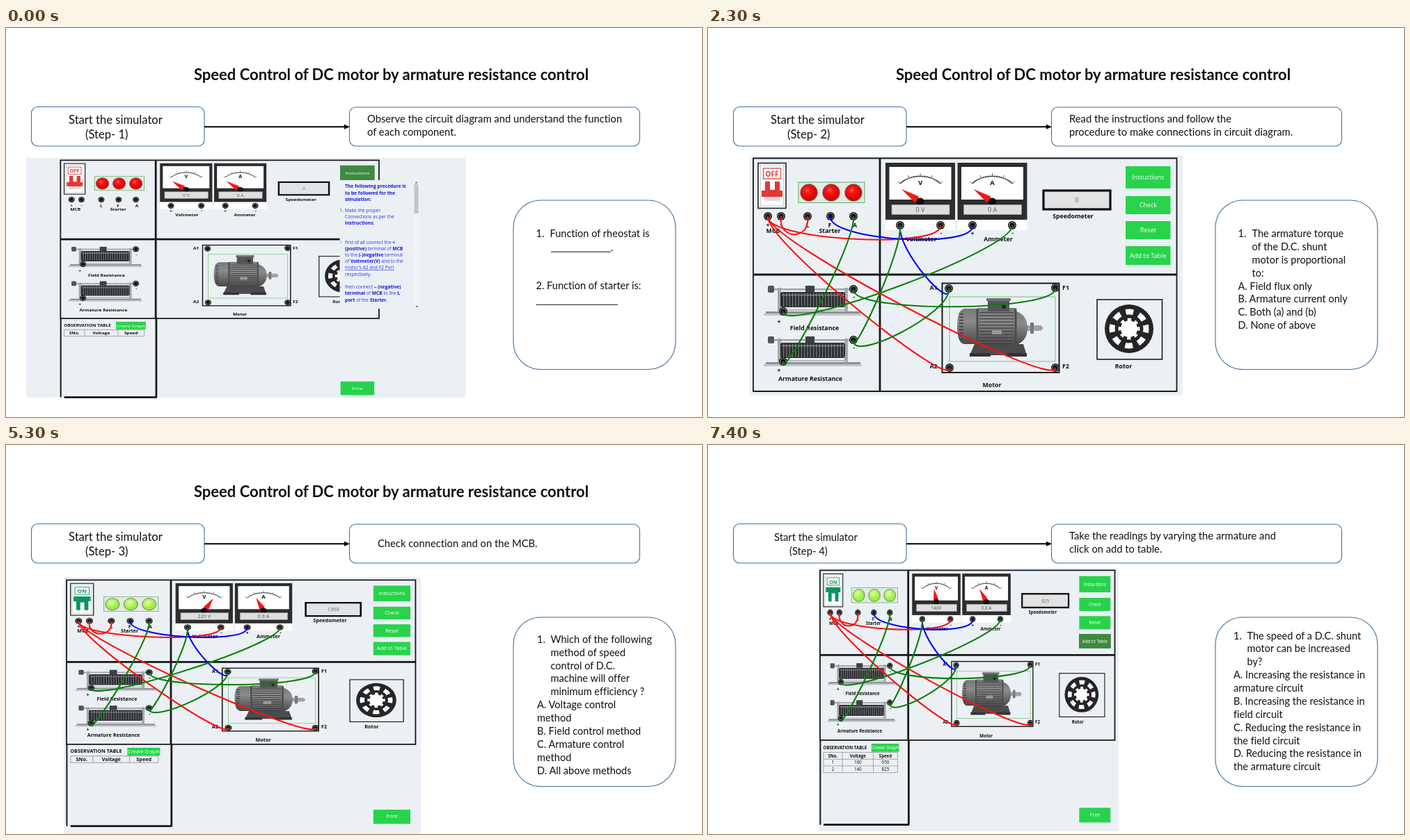
Animation of 1000x560 px, one loop 8 s. Source, as an HTML page:

```html
<!DOCTYPE html>
<html lang="en">
<head>
<meta charset="utf-8">
<title>DC motor speed control</title>
<style>
html, body { margin: 0; width: 100%; height: 100%; overflow: hidden; background: #fff }
svg { display: block; width: 1000px; height: 560px }
text { font-family: Lato, Carlito, sans-serif; font-size: 14.75px; font-variant-ligatures: none; fill: #111; white-space: pre }
.quiz text { font-size: 14.55px }
.ui text { font: 9px "Open Sans", "Noto Sans", sans-serif }
.ui .b { font-weight: 700; font-size: 8.8px }
.ui .help text { font-size: 6.6px; fill: #3434dd }
.help .b { font-size: 6.7px; fill: #1616e6 }
.mid { text-anchor: middle }
.box { fill: #fff; stroke: #41719c; stroke-width: 1.1 }
.frame, .wire { fill: none; vector-effect: non-scaling-stroke }
.frame { stroke: #16191c }
.wire { stroke-width: 2.1 }
</style>
</head>
<body>
<svg id="stage" viewBox="0 0 1000 560">
<defs>
  <linearGradient id="steel" x2="0" y2="1">
    <stop stop-color="#777"/><stop offset=".35" stop-color="#8b8b8b"/><stop offset="1" stop-color="#484848"/>
  </linearGradient>
  <radialGradient id="red" cx=".4" cy=".35"><stop stop-color="#ff5a4a"/><stop offset=".4" stop-color="#fb1212"/><stop offset="1" stop-color="#d80808"/></radialGradient>
  <radialGradient id="lime" cx=".4" cy=".35"><stop stop-color="#dcff9a"/><stop offset="1" stop-color="#9bec45"/></radialGradient>
</defs>
</svg>
<script>
const rect = (x, y, w, h, fill, extra = '') =>
  `<rect x="${x}" y="${y}" width="${w}" height="${h}" fill="${fill}" ${extra}/>`;
const text = (x, y, s, extra = '') => `<text x="${x}" y="${y}" ${extra}>${s}</text>`;
const mid = (x, y, s, extra = '') => text(x, y, s, `class="mid" ${extra}`);
const label = (x, y, s, extra = '') => text(x, y, s, `class="mid b" ${extra}`);
const disc = (x, y, r, fill, extra = '') => `<circle cx="${x}" cy="${y}" r="${r}" fill="${fill}" ${extra}/>`;
const path = (d, fill, extra = '') => `<path d="${d}" fill="${fill}" ${extra}/>`;
const line = (d, color, width = 1, extra = '') => path(d, 'none', `stroke="${color}" stroke-width="${width}" ${extra}`);
const frame = (d, width) => `<path class="frame" d="${d}" stroke-width="${width}"/>`;
const lines = (x, y, step, rows) => rows.map((s, i) => text(x, y + i * step, s)).join('');

const back = '#ebf0f5';
const terminal = (x, y) => disc(x, y, 6, '#111') + disc(x, y, 4.2, '#111', 'stroke="#aaa" stroke-width=".9"');

function button(y, h, s, active) {
  return rect(600, y, 64.5, h, active ? '#3d8b40' : '#28d34b', active ? 'stroke="#286f2d"' : '') +
    mid(632.3, y + h / 2 + 3.2, s, 'style="fill:#fff"');
}

function breaker(on) {
  const c = on ? '#0b9464' : '#e33836';
  return rect(72, 194.5, 40, 65, '#f4f5f7', 'stroke="#222" stroke-width="1.6"') +
    rect(75.5, 198, 33, 58, '#fdfdfd', 'stroke="#bbb" stroke-width=".7"') +
    rect(79.5, 202, 25, 15, '#fff', `stroke="${c}" stroke-width="1.2"`) +
    label(92, 214, on ? 'ON' : 'OFF', `style="fill:${c};font-size:10px"`) +
    (on ? path('M77 221H107V231H103V249H96V233H89V249H82V231H77Z', c)
        : rect(81, 242, 23, 7, '#ddd') + path('M82 221H89V233H96V221H103V234H107V243H77V234H82Z', c));
}

function meter(x, unit, value, tip) {
  let ticks = '';
  for (let i = 0; i <= 20; i++) {
    const a = (i / 20 - .5) * 1.55, r = i % 5 ? 43 : 46;
    ticks += `M${x + 41 * Math.sin(a)} ${250 - 36 * Math.cos(a)}L${x + r * Math.sin(a)} ${250 - (r - 5) * Math.cos(a)}`;
  }
  const dx = tip[0] - x, dy = tip[1] - 250, n = Math.hypot(dx, dy), px = -dy / n * 5, py = dx / n * 5;
  const bx = x + dx * .22, by = 250 + dy * .22;
  return rect(x - 50, 194, 100, 97, '#fff') + rect(x - 50, 194, 100, 82, '#2d2d2f') +
    rect(x - 44.5, 200, 89, 47, '#fff') +
    line(`M${x - 29} 224A41 36 0 0 1 ${x + 29} 224`, '#333', 1.2) + line(ticks, '#333', .8) +
    label(x, 226, unit, 'style="font-size:9.5px"') +
    path(`M${tip}L${bx + px} ${by + py}L${x} 250L${bx - px} ${by - py}Z`, '#fa1414') +
    disc(x, 250, 5.5, '#0b0b0b') +
    rect(x - 41, 254.5, 83, 14, '#dedede', 'stroke="#999" stroke-width=".8"') +
    mid(x, 265, value, 'style="fill:#555"');
}

function rheostat(y) {
  return `<g transform="translate(0 ${y})">` +
    rect(83, 38, 136, 4, '#8e9094') + rect(80, 41, 141, 3, '#c3c6ca') +
    rect(100, 4, 5, 35, '#a5a8ac') + rect(196, 4, 5, 35, '#a5a8ac') +
    rect(91, 5, 113, 2.5, '#a0a3a7') + rect(86, 1, 9, 10, '#50545a', 'rx="2"') +
    rect(140, 1, 13, 9, '#3d4146') +
    rect(104, 10, 93, 22, '#2b2c2e', 'rx="3"') +
    line('M108 21H195', '#77797c', 20, 'stroke-dasharray="1.3 3"') +
    line('M106 14.5H196', '#85898e', 1.6) +
    line('M104 36H198', '#b5b8bc', 2) + '</g>';
}

const motor = () =>
  path('M383 455H453L458 471H376Z', '#4b4b4d') + rect(376, 468, 30, 5, '#333') + rect(428, 468, 30, 5, '#333') +
  rect(476, 430, 5, 4, '#999') + rect(456, 428, 23, 8, '#a2a2a4') + rect(463, 424, 5, 16, '#77787a') +
  path('M440 407Q459 412 459 432Q459 452 440 457Z', 'url(#steel)') +
  path('M389 404H368Q358 406 358 430Q358 453 368 455H389Z', 'url(#steel)') +
  line('M364 411V449', '#3b3b3d', 6, 'stroke-dasharray="1.5 3"') +
  rect(386, 403, 57, 55, 'url(#steel)', 'rx="3"') +
  line('M414.5 409V456', '#3f4042', 50, 'stroke-dasharray="1.3 3.2"') +
  line('M387 404V457M442 404V457', '#4a4b4d', 3) +
  rect(402, 391, 31, 17, '#535456', 'rx="1.5"') + rect(400, 389, 35, 4, '#6f7072') + disc(425, 401, 3, '#222') +
  rect(408, 435, 14, 6, '#999');

// Ring of eight white blocks, one of them straight up
function blocks(r, width, share) {
  const step = r * Math.PI / 4;
  return disc(605, 433, r, 'none', `stroke="#fff" stroke-width="${width}" transform="rotate(${-22.5 * share} 605 433)"
    stroke-dasharray="${step * share} ${step * (1 - share)}"`);
}

const rotor = () =>
  rect(559, 391, 93.5, 86, back, 'stroke="#1c1c1c" stroke-width="1.6"') + disc(605, 433, 35, '#252527') +
  blocks(24.5, 8, .56) + disc(605, 433, 12, '#fff') + blocks(13, 5, .5);

const ports = {
  mcbP: [86, 271], mcbN: [105, 271], L: [143, 271], F: [176, 271], A: [209, 271],
  voltP: [276, 284], voltN: [334, 284], ampP: [380, 284], ampN: [437, 284],
  fieldN: [209, 376], fieldP: [108, 408], armN: [209, 449], armP: [108, 480],
  A1: [346, 375], F1: [499, 374], A2: [347, 489], F2: [499, 489],
};
const red = '#f11', blue = '#00f', green = '#078007';
const wires = [
  [red, 'mcbP', 'voltN'], [red, 'mcbN', 'L'], [red, 'mcbP', 'A2'], [red, 'mcbP', 'F2'],
  [blue, 'F', 'ampP'], [blue, 'voltP', 'A1'],
  [green, 'A', 'armP'], [green, 'voltP', 'armN'], [green, 'ampN', 'fieldP'], [green, 'fieldN', 'F1'], [green, 'armN', 'A1'],
];

// Every wire leaves both of its ports downwards
function wire([color, from, to]) {
  const [x1, y1] = ports[from], [x2, y2] = ports[to], out = x1 < x2 ? 5 : -5, sag = 35;
  return `<path class="wire" stroke="${color}" d="M${x1} ${y1}C${x1 - out} ${y1 + sag} ${x2 + out} ${y2 + sag} ${x2} ${y2}"/>`;
}

const labels = [[86, 287, '+'], [105, 286, '-'], [93.5, 295, 'MCB'], [143, 287, 'L'], [175, 287, 'F'], [211, 287, 'A'],
  [175, 295, 'Starter'], [276, 299, '+'], [335, 298, '-'], [306.5, 306.5, 'Voltmeter'], [380, 299, '+'], [438, 298, '-'],
  [417, 306.5, 'Ammeter'], [524.5, 274, 'Speedometer'], [210, 390, '-'], [102, 426, '+'], [153, 434.5, 'Field Resistance'],
  [210, 463, '-'], [102, 496, '+'], [147, 507.5, 'Armature Resistance'], [324, 377, 'A1'], [514, 377, 'F1'],
  [324, 490, 'A2'], [514, 490, 'F2'], [408, 517, 'Motor'], [597, 490, 'Rotor']];

function table(rows) {
  const cols = [72, 111, 175, 225];
  const bottom = 560.5 + rows.length * 13.3;
  const row = (cells, y, put) => cells.map((s, i) => put((cols[i] + cols[i + 1]) / 2, y, s)).join('');
  return frame('M65.5 523V690', 2) + frame('M248 523V690M72 690H249', 2.8) +
    text(71.5, 540.5, 'OBSERVATION TABLE', 'class="b"') +
    rect(171, 530, 57, 16, '#28d34b') + mid(199.5, 541.3, 'Create Graph', 'style="fill:#fff"') +
    line(cols.map(x => `M${x} 547V${bottom}`).join('') + `M72 547H225M72 560.5H225` +
      rows.map((_, i) => `M72 ${573.8 + i * 13.3}H225`).join(''), '#8b8b8b', 1) +
    row(['SNo.', 'Voltage', 'Speed'], 557, label) +
    rows.map((r, i) => row(r, 570.3 + i * 13.3, mid)).join('') +
    button(656.5, 29, 'Print');
}

function help() {
  const b = s => `<tspan class="b">${s}</tspan>`;
  const rows = [
    [230, b('The following procedure is')], [239.5, b('to be followed for the')], [249, b('simulation:')],
    [264.5, 'Make the proper'], [274, 'Connections as per the'], [283, b('Instructions.')],
    [310.5, 'first of all connect the ' + b('+')], [319.8, b('(positive)') + ' terminal of ' + b('MCB')],
    [329, 'to the ' + b('(-)negative') + ' terminal'], [338.2, 'of ' + b('Voltmeter(V)') + ' and to the'],
    [347.3, '<tspan text-decoration="underline">motor\'s A2 and F2 Port</tspan>'], [356.5, 'respectively .'],
    [375, 'then connect ' + b('– (negative)')], [384.3, b('terminal') + ' of ' + b('MCB') + ' to the ' + b('L')],
    [393.5, b('port') + ' of the ' + b('Starter.')]];
  return '<g class="help">' + rect(479.5, 219, 114, 185, back) +
    rows.map(([y, s]) => text(487, y, s)).join('') +
    text(479.5, 264.5, '1.') + text(480, 310, '›') + text(480, 374.5, '›') +
    rect(586, 219, 7, 185, '#f1f2f4') + rect(586.5, 225, 6, 42, '#c3c4c6') +
    path('M587.5 223.5L589.5 221L591.5 223.5ZM588.5 400L590.5 402.5L592.5 400Z', '#666') + '</g>';
}

function panel(o) {
  const [x, y, sx, sy] = o.place;
  const lamps = [145, 177, 209].map(cx =>
    disc(cx, 237, 13, '#a9adab') + disc(cx, 237, 11.8, o.on ? 'url(#lime)' : 'url(#red)',
      `stroke="${o.on ? '#5d8040' : '#842020'}" stroke-width=".8"`)).join('');
  const actions = o.guide ? '' : button(242, 26, 'Check') + button(278, 26, 'Reset') + button(314, 27, 'Add to Table', o.adding);
  return '<g class="ui">' + rect(...o.area, back) +
    `<g transform="translate(${x} ${y}) scale(${sx} ${sy}) translate(-65 -187)">` +
    frame('M65 187.5H673.5V523H65Z', 1.8) + frame('M247 187V523M65 355H673', 2.8) +
    breaker(o.on) + rect(130, 222, 95, 29.5, '#e4e9e6', 'stroke="#58b158" stroke-width="1"') + lamps +
    meter(305, 'V', o.volts, o.vTip) + meter(408.5, 'A', o.amps, o.aTip) +
    rect(482, 234, 96, 27, '#e2e3e4', 'stroke="#0d0d0d" stroke-width="3.2"') +
    mid(530, 250.8, o.speed, 'style="fill:#666"') +
    button(199, 32, 'Instuctions', o.guide) + actions +
    rheostat(370) + rheostat(443) +
    rect(336.5, 367.5, 168, 128.5, 'none', 'stroke="#1c1c1c" stroke-width="2"') +
    rect(347, 387, 152, 93, 'none', 'stroke="#6cbd6c" stroke-width=".9"') + motor() + rotor() +
    labels.map(l => label(...l)).join('') + Object.values(ports).map(p => terminal(...p)).join('') +
    (o.guide ? '' : wires.map(wire).join('')) +
    (o.rows ? table(o.rows) : '') + '</g>' + (o.guide ? help() : '') + '</g>';
}

const off = { volts: '0 V', amps: '0 A', speed: '0', vTip: [278, 232], aTip: [381.5, 232] };
const slides = [
  { ...off, until: 500, guide: true, rows: [], area: [29, 187, 631, 345], place: [78.3, 190, .752, .679],
    task: lines(519, 136, 19, ['Observe the circuit diagram and understand the function', 'of each component.']),
    quiz: text(761.5, 301, '1.') + text(781.5, 301, 'Function of rheostat is') + text(869, 321, '.') +
      text(761.5, 376, '2. Function of starter is:') + line('M783 322.3H869M761.5 398.3H879', '#111', 1.1) },
  { ...off, until: 3500, area: [60, 184, 622, 345], place: [65, 187, 1, 1],
    task: lines(519, 136, 19, ['Read the instructions and follow the', 'procedure to make connections in circuit diagram.']),
    quiz: text(761.5, 301, '1.') + lines(781.5, 301, 18.9, ['The armature torque', 'of the D.C. shunt', 'motor is proportional', 'to:']) +
      lines(761.5, 376.5, 18.9, ['A. Field flux only', 'B. Armature current only', 'C. Both (a) and (b)', 'D. None of above']) },
  { until: 6500, on: true, volts: '220 V', amps: '0.8 A', speed: '1360', vTip: [321, 225], aTip: [395.5, 224], rows: [],
    area: [83, 190, 513, 370], place: [87, 194, .824, .705],
    task: text(534, 147, 'Check connection and on the MCB.'),
    quiz: text(763, 285, '1.') + lines(782.5, 285, 18.8, ['Which of the following', 'method of speed', 'control of D.C.', 'machine will offer', 'minimum efficiency ?']) +
      lines(763, 379, 18.9, ['A. Voltage control', 'method', 'B. Field control method', 'C. Armature control', 'method', 'D. All above methods']) },
  { until: 8000, on: true, adding: true, volts: '140V', amps: '0.8 A', speed: '825', vTip: [300.5, 224], aTip: [394, 224],
    rows: [['1', '160', '950'], ['2', '140', '825']], area: [159, 177, 431, 379], place: [161, 180, .696, .729],
    task: lines(519, 136, 19, ['Take the readings by varying the armature and', 'click on add to table.']),
    quiz: text(755, 279.5, '1.') + lines(774.5, 279.5, 18.9, ['The speed of a D.C. shunt', 'motor can be increased', 'by?']) +
      lines(755, 336, 18.9, ['A. Increasing the resistance in', 'armature circuit', 'B. Increasing the resistance in', 'field circuit',
        'C. Reducing the resistance in', 'the field circuit', 'D. Reducing the resistance in', 'the armature circuit']) },
];

const stage = document.getElementById('stage');
const card = (x, y, w, h, r) => `<rect class="box" x="${x}" y="${y}" width="${w}" height="${h}" rx="${r}"/>`;
stage.innerHTML += card(36.5, 113.5, 248.5, 56.5, 9) + card(493.5, 114, 417, 56, 9) + card(729, 248, 233, 243.5, 39) +
  line('M285 142.3H488', '#000', 2) + path('M486 138.8L494 142.3L486 145.8Z', '#000') +
  slides.map((s, i) => {
    const last = i === 3, big = last ? '' : 'style="font-size:16.6px"';
    const title = last ? '' : text(270, 75, 'Speed Control of DC motor by armature resistance control', 'style="font-size:22px;font-weight:700"');
    const step = text(last ? 95 : 90, 138, 'Start the simulator', big) + text(last ? 117 : 114, last ? 157.5 : 159, `(Step- ${i + 1})`, big);
    return `<g class="slide">${title}${step}${s.task}<g class="quiz">${s.quiz}</g>${panel(s)}</g>`;
  }).join('');

const groups = stage.querySelectorAll('.slide');
function draw() {
  const t = performance.now() % 8000;
  const now = slides.findIndex(s => t < s.until);
  groups.forEach((g, i) => g.style.display = i === now ? '' : 'none');
  requestAnimationFrame(draw);
}
draw();
</script>
</body>
</html>
```
